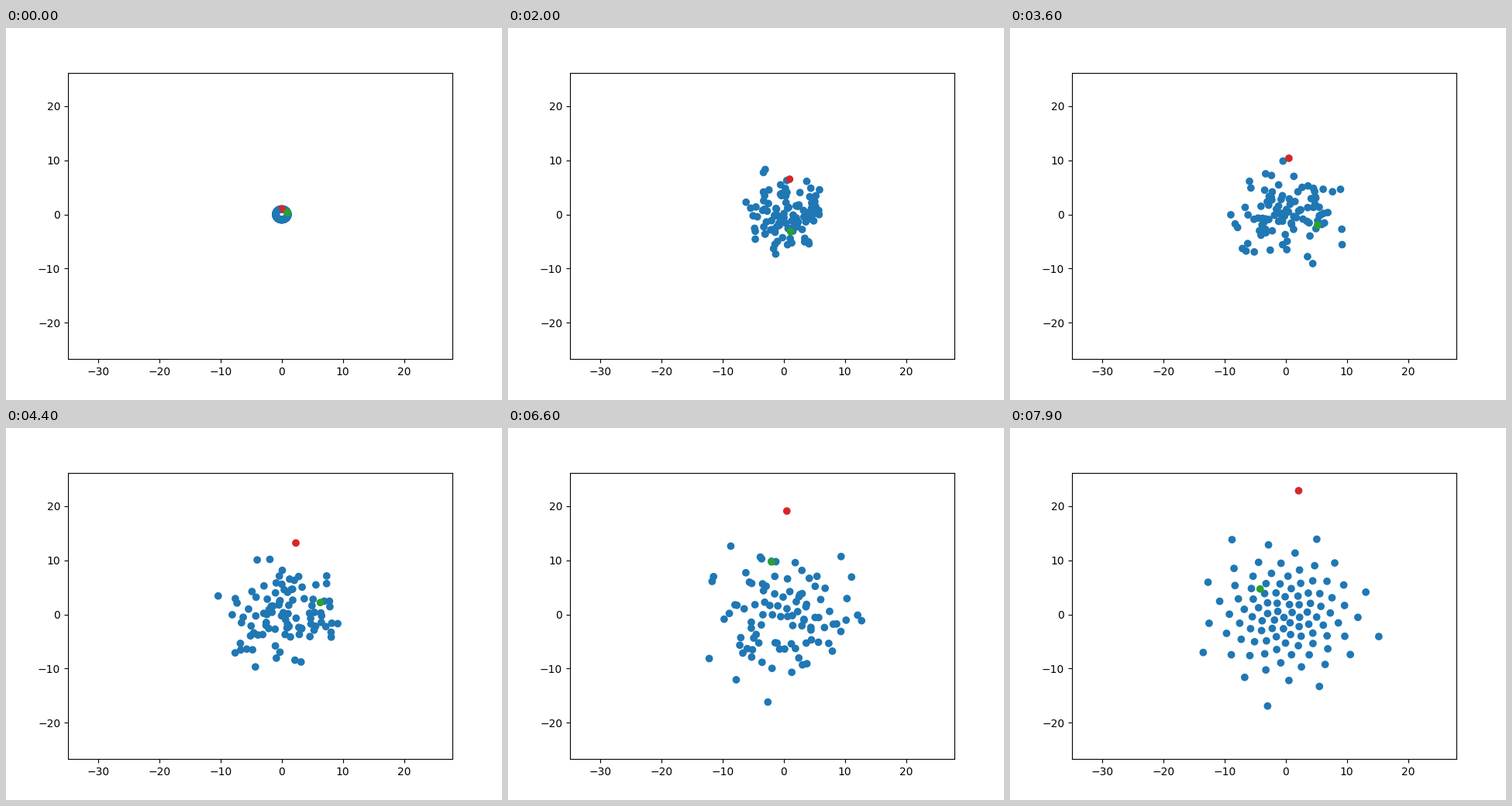
Animation of 640 by 480 pixels, one loop 8000 ms. Source, as a matplotlib script:

```python
import numpy as np
import matplotlib.pyplot as plt
from matplotlib.animation import FuncAnimation

FRAMES = 80
BLUES = 98
SIGMA = np.sqrt(FRAMES / 2)
GOLDEN = np.pi * (3 - np.sqrt(5))

# Steps at which the two marked walkers pass their stops.
KNOTS = [1, 12, 28, 44, 53, 66, 79]
RED = [(0, 1), (-0.4, 4.4), (1.1, 9.6), (2.3, 13.2), (0.4, 15.2),
       (0.5, 19.1), (2.1, 22.85)]
GREEN = [(0.94, 0.34), (1.7, -1), (1.8, -5.3), (6.3, 2.2), (4.1, 2.9),
         (-2, 9.7), (-4.2, 4.7)]

rng = np.random.default_rng(12)


def polar(r, angle):
    return np.stack([r * np.cos(angle), r * np.sin(angle)], axis=-1)


def bridge(start, end, n):
    """Random walk of n near-unit steps that begins at start and lands on end."""
    steps = polar(1, rng.uniform(0, 2 * np.pi, (n, len(start))))
    drift = (end - start) / n
    for _ in range(40):
        steps /= np.linalg.norm(steps, axis=-1, keepdims=True) + 1e-9
        steps += drift - steps.mean(axis=0)
    return start + np.cumsum(steps, axis=0)


def walk_through(stops, knots):
    """Chain bridges from stop to stop; stops has shape (knots, walkers, 2)."""
    path = [stops[:1]]
    for a, b, n in zip(stops, stops[1:], np.diff(knots)):
        path.append(bridge(a, b, n))
    return np.concatenate(path)


def blue_stops():
    """From a unit ring to a normally spread cloud."""
    i = np.arange(BLUES)
    back = i - BLUES + 1
    ring = polar(1, np.radians(150) + 2 * np.pi * back / BLUES)
    reach = SIGMA * np.sqrt(-2 * np.log(1 - (i + 0.5) / 100))
    cloud = polar(reach, np.radians(-100) + GOLDEN * back)
    return np.stack([ring, cloud])


blue = walk_through(blue_stops(), [KNOTS[0], KNOTS[-1]])
marked = walk_through(np.stack([RED, GREEN], axis=1), KNOTS)
walk = np.concatenate([blue[:, :-1], marked, blue[:, -1:]], axis=1)
colors = ["C0"] * (BLUES - 1) + ["C3", "C2", "C0"]

fig, ax = plt.subplots(figsize=(6.4, 4.8), dpi=100)
ax.set_xlim(-34.98, 27.91)
ax.set_ylim(-26.72, 26.19)
dots = ax.scatter(walk[0, :, 0], walk[0, :, 1], c=colors)


def update(frame):
    dots.set_offsets(walk[max(frame - 1, 0)])
    return (dots,)


anim = FuncAnimation(fig, update, frames=FRAMES, interval=100, repeat=True,
                     repeat_delay=0)
plt.show()
```
